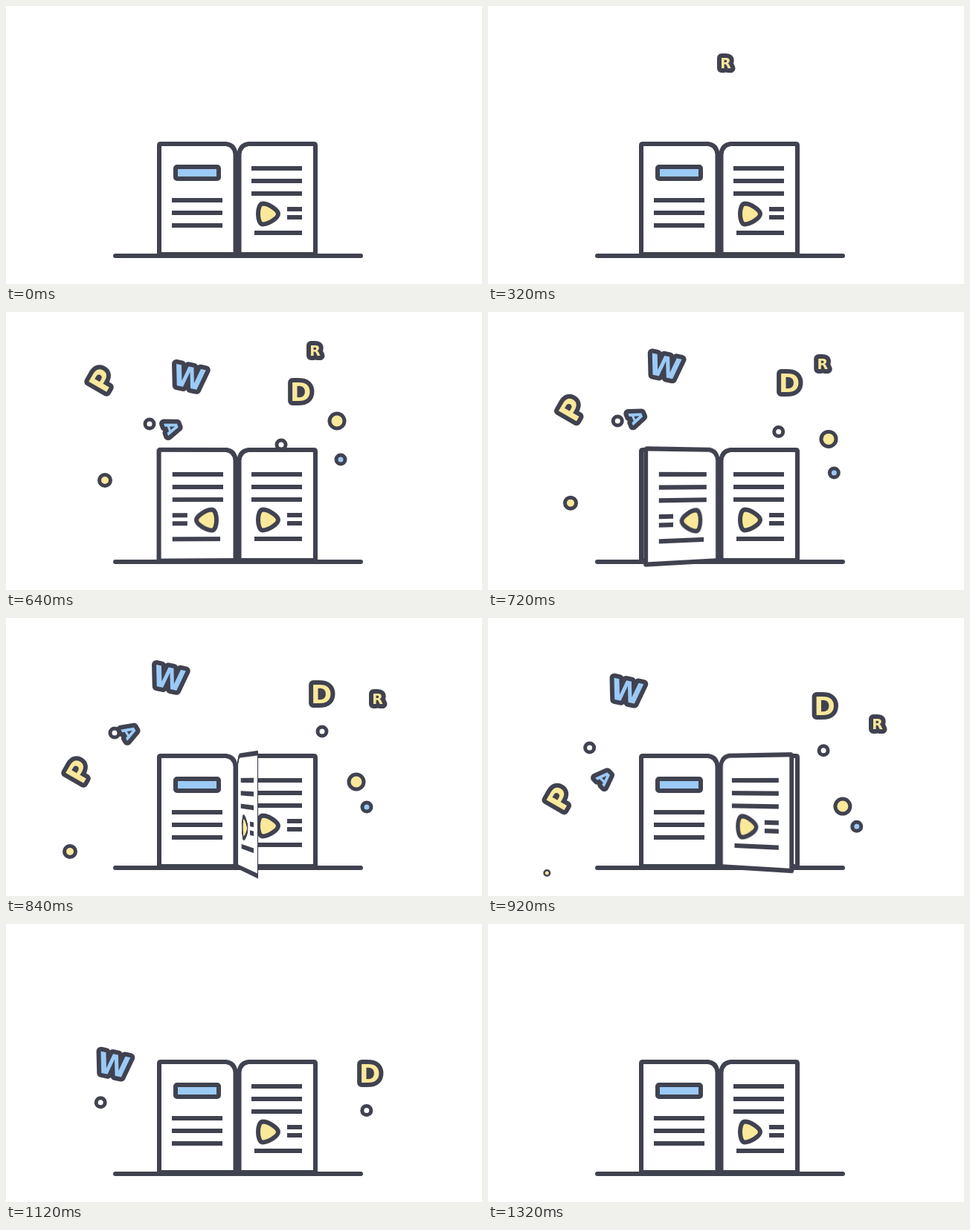
An HTML page that plays this animation: 640x375 px, repeating every 1.36 s.

```html
<!DOCTYPE html>
<html lang="en">
<head>
<meta charset="utf-8">
<title>Book</title>
<style>
html, body { margin: 0; width: 100%; height: 100%; overflow: hidden; background: #fff; }
#stage { position: relative; width: 640px; height: 375px; overflow: hidden; perspective: 1000px; perspective-origin: 311px 220px; }
svg { position: absolute; left: 0; top: 0; width: 640px; height: 375px; }
#page { transform-origin: 311px 0; visibility: hidden; }
.ink { stroke: #404250; stroke-width: 6; stroke-linejoin: round; fill: none; }
.paper { fill: #fff; }
.blue { fill: #9bcaf6; }
.yellow { fill: #fae89b; }
.white { fill: #fff; }
text { font-family: "DejaVu Sans", Verdana, sans-serif; font-weight: bold; text-anchor: middle; stroke: #404250; stroke-width: 12; stroke-linejoin: round; paint-order: stroke; }
circle { stroke: #404250; stroke-width: 5; }
</style>
</head>
<body>
<div id="stage">
  <svg viewBox="0 0 640 375">
    <defs>
      <path id="sheet" class="ink paper" d="M313.5 335V200Q314.500 187.500 326 186H414Q416 186 416 188V335Z"/>
      <g id="copy" class="ink">
        <path d="M330 219h68M330 236h68M330 253h68M378 274h20M378 285h20M334 306h64"/>
        <path class="yellow" d="M345 266.500C353 266.500 366 275 366 280.500S353 294.500 345 294.500C337 294 337 267 345 266.500Z"/>
      </g>
      <clipPath id="wipe"><path id="edge"/></clipPath>
    </defs>
    <g id="bits"></g>
    <use href="#sheet" transform="translate(622) scale(-1 1)"/>
    <use href="#sheet"/>
    <use href="#copy"/>
    <g clip-path="url(#wipe)"><use href="#copy" transform="translate(622) scale(-1 1)"/></g>
    <g class="ink">
      <rect class="blue" x="228" y="217" width="58" height="16" rx="2"/>
      <path d="M223 262h68M223 279h68M223 296h68"/>
      <path d="M147 337H477" stroke-linecap="round"/>
    </g>
  </svg>
  <svg id="page" viewBox="0 0 640 375">
    <use href="#sheet"/>
    <use href="#copy"/>
  </svg>
</div>
<script>
const LOOP = 1360, STEP = 40;
const TIMES = [320, 480, 640, 840, 1000, 1300];
const $ = id => document.getElementById(id);

// Each bit: glyph or radius, size, colour, tilt, vanish time, path
const bits = [
  { r: 6, fill: 'white', end: 1260, x: [232, 214, 193, 146, 132, 122], y: [240, 190, 151, 155, 202, 300] },
  { r: 6, fill: 'white', end: 1260, x: [325, 340, 370, 425, 472, 496], y: [270, 235, 179, 153, 214, 305] },
  { r: 6, fill: 'blue', end: 1120, x: [375, 412, 450, 485, 503, 512], y: [240, 205, 199, 255, 306, 375] },
  { r: 10, fill: 'yellow', end: 1120, x: [355, 400, 445, 471, 480, 484], y: [215, 150, 147, 221, 284, 360] },
  { r: 7.5, fill: 'yellow', end: 960, x: [250, 191, 133, 86, 78, 78], y: [260, 227, 227, 315, 365, 400] },
  { ch: 'A', size: 23, fill: 'blue', tilt: [80, 75, 70, 60, 30, 0], end: 1100, x: [275, 255, 223, 166, 153, 150], y: [290, 235, 156, 154, 284, 390] },
  { ch: 'W', size: 39, fill: 'blue', tilt: 12, end: 1300, x: [270, 262, 246, 219, 157, 138], y: [280, 204, 88, 81, 130, 288] },
  { ch: 'D', size: 34, fill: 'yellow', tilt: 0, end: 1300, x: [370, 382, 397, 425, 479, 496], y: [280, 210, 108, 103, 147, 290] },
  { ch: 'P', size: 38, fill: 'yellow', tilt: -60, end: 1120, x: [245, 186, 129, 98, 98, 98], y: [216, 98, 91, 206, 271, 345] },
  { ch: 'R', size: 19, fill: 'yellow', tilt: 0, end: 1120, times: [0, 160, ...TIMES],
    x: [276, 293, 320, 361, 416, 500, 538, 540], y: [212, 140, 77, 53, 52, 109, 182, 330] }
];

const clamp = v => Math.min(1, Math.max(0, v));

// Smooth curve through unevenly spaced keys
function spline(ts, vs, t) {
  const last = ts.length - 1;
  if (t <= ts[0]) return vs[0];
  if (t >= ts[last]) return vs[last];
  let i = 0;
  while (t > ts[i + 1]) i++;
  const slope = k => {
    const a = Math.max(0, k - 1), b = Math.min(last, k + 1);
    return (vs[b] - vs[a]) / (ts[b] - ts[a]);
  };
  const d = ts[i + 1] - ts[i], u = (t - ts[i]) / d, v = 1 - u;
  return v * v * (1 + 2 * u) * vs[i] + u * u * (3 - 2 * u) * vs[i + 1]
    + d * u * v * (v * slope(i) - u * slope(i + 1));
}

function build(bit) {
  const el = document.createElementNS('http://www.w3.org/2000/svg', bit.ch ? 'text' : 'circle');
  el.setAttribute('class', bit.fill);
  if (bit.ch) {
    el.textContent = bit.ch;
    el.setAttribute('font-size', bit.size);
    el.setAttribute('x', 'PRD'.includes(bit.ch) ? -0.025 * bit.size : 0);
    el.setAttribute('y', 0.365 * bit.size);
  } else {
    el.setAttribute('r', bit.r);
  }
  $('bits').append(el);
  bit.el = el;
}

function place(bit, t) {
  const ts = bit.times || TIMES;
  const tilt = Array.isArray(bit.tilt) ? spline(ts, bit.tilt, t) : bit.tilt || 0;
  const scale = clamp((bit.end - t) / 80);
  bit.el.style.display = scale > 0 ? '' : 'none';
  bit.el.setAttribute('transform',
    `translate(${spline(ts, bit.x, t)} ${spline(ts, bit.y, t)}) rotate(${tilt}) scale(${scale})`);
}

function draw(t) {
  bits.forEach(bit => place(bit, t));

  // Slanted wipe of the next page's text
  const wiping = t >= 400 && t < 600;
  const x = wiping ? 254 - (t - 480) * 0.8 : 311;
  $('edge').setAttribute('d', wiping ? `M${x + 12} 184L${x - 22} 332H311V184Z` : 'M0 0');

  // Page turns from left to right
  const u = clamp((t - 600) / 445);
  const ease = u < 0.5 ? 2 * u * u : 1 - 2 * (1 - u) ** 2;
  $('page').style.visibility = t >= 600 && u < 1 ? 'visible' : 'hidden';
  $('page').style.transform = `rotateY(${-180 * (1 - ease)}deg)`;
}

bits.forEach(build);
const start = performance.now();
function tick() {
  const t = (performance.now() - start) % LOOP;
  draw(Math.floor(t / STEP) * STEP);
  requestAnimationFrame(tick);
}
tick();
</script>
</body>
</html>
```
